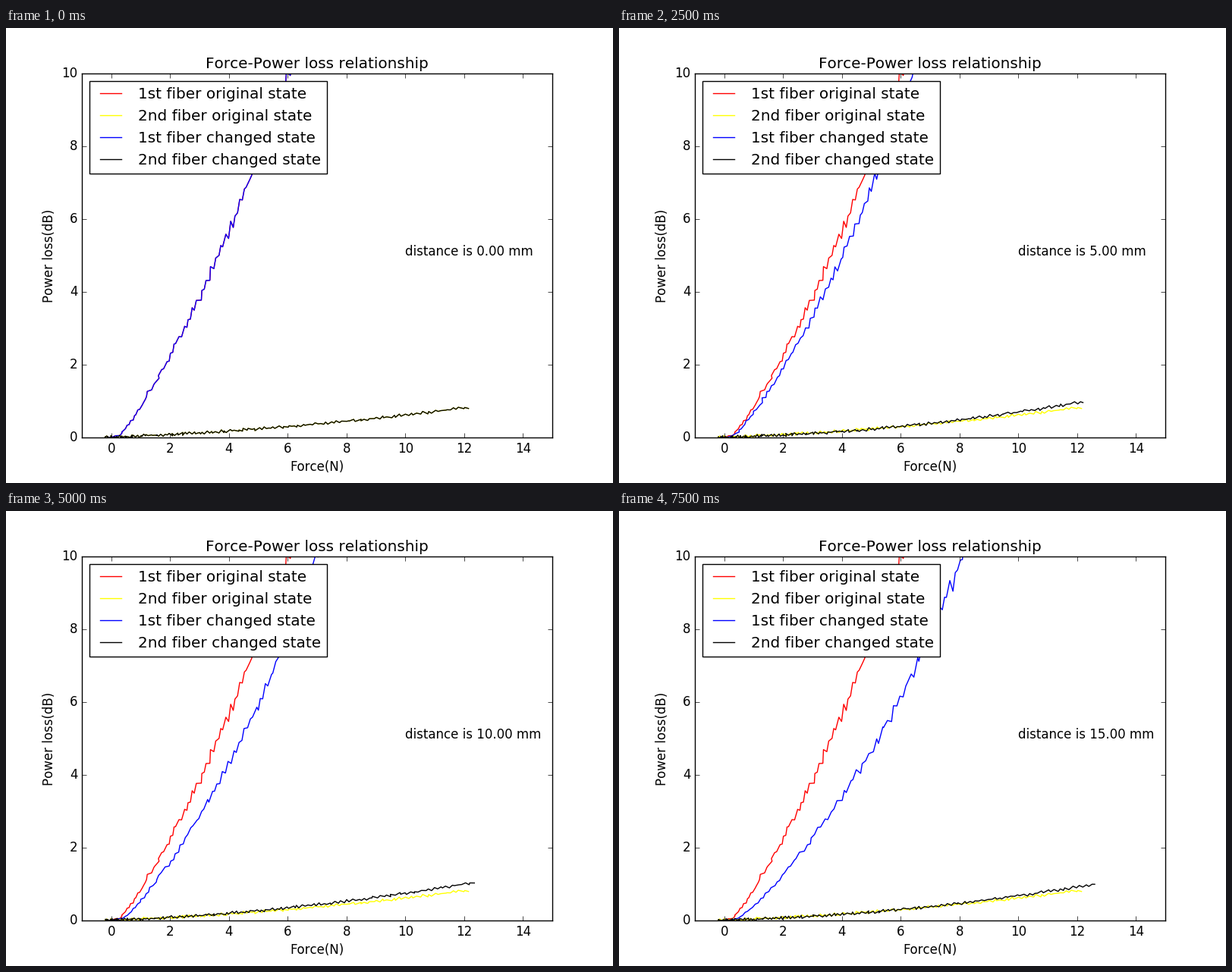
Animation, 800 px wide and 600 px high, one loop 8000 ms. Source, as a matplotlib script:

```python
import numpy as np
import matplotlib.pyplot as plt
from matplotlib.animation import FuncAnimation

plt.style.use("classic")
plt.rcParams.update({"font.family": "DejaVu Sans", "text.kerning_factor": 6})

FRAMES = 16
STEP_MS = 500

# Curve parameters at a few key distances, linear in between
KEYS = [0, 2, 7, 10, 15]
SCALE = [.92, .92, 1.10, 1.13, 1.35]        # force at low loss, 1st fiber
TOP = [6.05, 5.97, 6.68, 6.97, 8.08]        # force at a loss of 10, 1st fiber
SLOPE = [.030, .012, .025, .030, .022]      # linear loss, 2nd fiber
CURVE = [.0031, .0048, .0050, .0044, .0045]  # quadratic loss, 2nd fiber


def at(dist, values):
    return np.interp(dist, KEYS, values)


def zigzag(rng, n):
    return (-1) ** np.arange(n) * rng.uniform(0, 1, n)


def steep(dist):
    """Force rises as a power of the loss and bends back at the top."""
    rng = np.random.RandomState(dist)
    n = 85
    y = 10.6 * np.linspace(0, 1, n) ** 1.5
    start, scale = .2 + .013 * dist, at(dist, SCALE)
    bend = (start + scale * 10 ** .85 - at(dist, TOP)) / 100
    x = start + scale * y ** .85 - bend * y ** 2 - .35 * np.exp(-y / .04)
    x += rng.normal(0, .025, n)
    return x, y + zigzag(rng, n) * (.02 + .027 * y)


def flat(dist):
    """Loss grows with the square of the force."""
    rng = np.random.RandomState(100 + dist)
    n = 160
    end = 12.15 + .002 * dist ** 2
    x = -.2 + (end + .2) * np.linspace(0, 1, n) ** 1.35
    x[1:-1] += rng.normal(0, .03, n - 2)
    y = .01 + at(dist, SLOPE) * x + at(dist, CURVE) * x ** 2
    return x, y + .045 * zigzag(rng, n)


fig = plt.figure(figsize=(8, 6), dpi=100, facecolor="white")
ax = fig.add_subplot(111)
ax.plot(*steep(0), color="red", label="1st fiber original state")
ax.plot(*flat(0), color="yellow", label="2nd fiber original state")
first, = ax.plot([], [], color="blue", label="1st fiber changed state")
second, = ax.plot([], [], color="black", label="2nd fiber changed state")
note = ax.text(10, 5, "")

ax.set_xlim(-1, 15)
ax.set_ylim(0, 10)
ax.set_xticks(range(0, 15, 2))
ax.set_yticks(range(0, 11, 2))
ax.set_title("Force-Power loss relationship")
ax.set_xlabel("Force(N)")
ax.set_ylabel("Power loss(dB)")
ax.legend(loc="upper left")


def update(dist):
    first.set_data(*steep(dist))
    second.set_data(*flat(dist))
    note.set_text(f"distance is {dist:.2f} mm")
    return first, second, note


anim = FuncAnimation(fig, update, frames=FRAMES, interval=STEP_MS,
                     repeat=True, repeat_delay=0)
plt.show()
```
